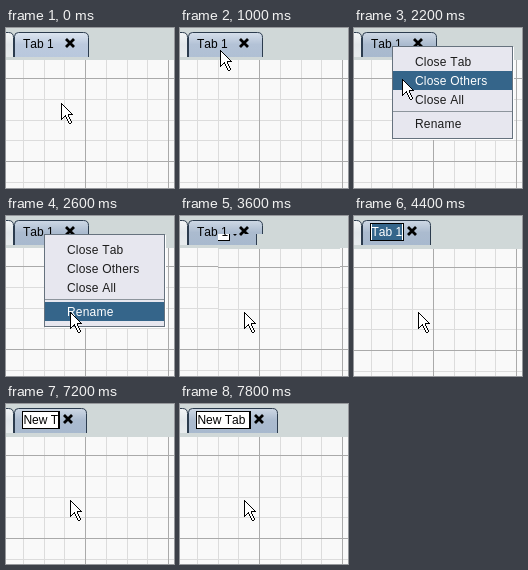
An HTML page with a canvas for the animation above (8000 ms loop, 168 by 160 pixels).

```html
<!DOCTYPE html>
<html lang="en">
<head>
<meta charset="utf-8">
<title>Renaming a tab</title>
<style>
  html, body { margin: 0; width: 100%; height: 100%; overflow: hidden; background: #d0d8d8; }
  canvas { display: block; width: 168px; height: 160px; }
</style>
</head>
<body>
<canvas id="stage" width="168" height="160"></canvas>
<script>
const W = 168, H = 160, LOOP = 8000;
const ctx = document.getElementById('stage').getContext('2d');
const SELECT = '#35658a';

// [time, x, y] of the pointer tip
const pointer = [
  [0, 55, 75], [400, 54, 69], [600, 44, 40], [800, 42, 29], [1000, 40, 22],
  [1200, 38, 18], [2200, 48, 51], [2400, 57, 83], [2600, 64, 96]
];
// [time, text] in the edit field
const typed = [
  [3600, 'Tab 1'], [5600, 'Ne'], [6400, 'New'], [6800, 'New '],
  [7200, 'New T'], [7400, 'New Ta'], [7600, 'New Tab'], [7800, 'New Tab ']
];
// [label, top of row]
const items = [['Close Tab', 24], ['Close Others', 43], ['Close All', 62], ['Rename', 86]];

const latest = (list, t) => list.filter(k => k[0] <= t).pop();
const between = (t, a, b) => t >= a && t < b;

function box(color, x, y, w, h) {
  ctx.fillStyle = color;
  ctx.fillRect(x, y, w, h);
}

function frame(color, x, y, w, h) {
  ctx.strokeStyle = color;
  ctx.lineWidth = 1;
  ctx.strokeRect(x + 0.5, y + 0.5, w - 1, h - 1);
}

function label(text, x, y, color = '#000', spacing = 0) {
  ctx.letterSpacing = spacing + 'px';
  ctx.fillStyle = color;
  ctx.fillText(text, x, y);
  ctx.letterSpacing = '0px';
}

function drawPaper(shift) {
  const top = 32 + shift;
  box('#d0d8d8', 0, 0, W, H);
  box('#f9f9f9', 0, top, W, H);
  for (const major of [false, true]) {
    const color = major ? '#aaaaaa' : '#dcdcdc';
    for (let i = -1; i < 9; i++) {
      if ((i % 4 === 0) !== major) continue;
      const x = Math.round(79 + (i - 4) * 20.75);
      const y = Math.round(51 + i * 20.75) - 1 + shift;
      box(color, x, top, 1, H);
      if (y > top) box(color, 0, y, W, 1);
    }
  }
}

function tabShape(left, right, colors) {
  const l = left + 0.5, r = right - 0.5, top = 4.5, bottom = 29;
  const fill = ctx.createLinearGradient(0, 4, 0, bottom);
  colors.forEach((c, i) => fill.addColorStop(i / (colors.length - 1), c));
  ctx.beginPath();
  ctx.moveTo(l, bottom);
  ctx.lineTo(l, top + 4);
  ctx.quadraticCurveTo(l, top, l + 4, top);
  ctx.lineTo(r - 5, top);
  ctx.quadraticCurveTo(r, top, r, top + 5);
  ctx.lineTo(r, bottom);
  ctx.fillStyle = fill;
  ctx.fill();
  ctx.strokeStyle = '#2c3c4e';
  ctx.lineWidth = 1;
  ctx.stroke();
}

function drawCross(x, y) {
  ctx.strokeStyle = '#000';
  ctx.lineWidth = 2.8;
  ctx.beginPath();
  ctx.moveTo(x + 1, y + 1);
  ctx.lineTo(x + 9, y + 9);
  ctx.moveTo(x + 9, y + 1);
  ctx.lineTo(x + 1, y + 9);
  ctx.stroke();
}

function drawTabs(right, hover) {
  const shades = [
    ['#dfe7f1', '#bccade', '#b9c8dd'],
    ['#d8e1ec', '#b3c2d6', '#b0c0d4'],
    ['#d0dae6', '#abbbcf', '#a8b9ce']
  ];
  tabShape(-30, 8, ['#f4f6f7', '#e2e7ea', '#e8ecee']);
  tabShape(8, right, shades[hover]);
  drawCross(right - 24, 10);
}

function drawIdle(hover) {
  drawPaper(0);
  drawTabs(83, hover);
  label('Tab 1', 17, 20);
}

function drawEditing(text, selected, caretOn) {
  const caret = 18 + Math.floor(ctx.measureText(text).width + 0.1);
  drawPaper(1);
  drawTabs(caret + 29, 2);
  box('#fff', 16, 7, caret - 14, 18);
  frame('#000', 16, 7, caret - 14, 18);
  if (selected) box(SELECT, 18, 8, caret - 18, 16);
  label(text, 17.4, 20, selected ? '#fff' : '#000');
  if (caretOn) box('#000', caret, 8, 1, 16);
}

function drawMenu(active) {
  box('#fff', 39, 19, 121, 93);
  box('#e7e7ef', 38, 18, 121, 93);
  frame('#66727e', 38, 18, 121, 93);
  box('#8d959c', 39, 83, 119, 1);
  for (const [name, y] of items) {
    const on = name === active;
    if (on) box(SELECT, 39, y, 119, 19);
    label(name, 61, y + 14, on ? '#fff' : '#1c1c1c', 0.2);
  }
}

function drawPointer(px, py) {
  const span = (row, a, b) => {
    box('#000', px + a, py + row, b - a + 1, 1);
    if (b - a > 1) box('#fff', px + a + 1, py + row, b - a - 1, 1);
  };
  for (let row = 0; row <= 11; row++) span(row, 0, row);
  box('#000', px + 7, py + 11, 5, 1);
  for (let row = 12; row < 20; row++) {
    const stem = 4 + Math.floor((row - 12) / 2);
    if (row <= 16) span(row, 0, 16 - row);
    span(row, stem, stem + 3);
  }
  span(20, 8, 9);
}

function draw(t) {
  ctx.font = '12px "Liberation Sans", Arial, sans-serif';
  ctx.fontKerning = 'none';
  const hover = t < 1000 ? 0 : t < 1200 ? 1 : 2;
  if (t < 3800) drawIdle(hover);

  if (between(t, 1600, 3600)) {
    drawMenu(between(t, 2200, 2400) ? 'Close Others' : t >= 2600 ? 'Rename' : '');
  } else if (between(t, 3600, 3800)) {
    // only the area under the closed menu is repainted at first
    ctx.save();
    ctx.beginPath();
    ctx.rect(38, 18, 122, 94);
    ctx.clip();
    drawEditing('Tab 1', false, false);
    ctx.restore();
  } else if (t >= 3800) {
    const caretOff = between(t, 4400, 4800) || between(t, 5400, 5600) || between(t, 6200, 6400);
    drawEditing(latest(typed, t)[1], t < 5600, !caretOff);
  }

  const [, x, y] = latest(pointer, t);
  drawPointer(x, y);
}

const start = performance.now();
function tick() {
  draw((performance.now() - start) % LOOP);
  requestAnimationFrame(tick);
}
tick();
</script>
</body>
</html>
```
